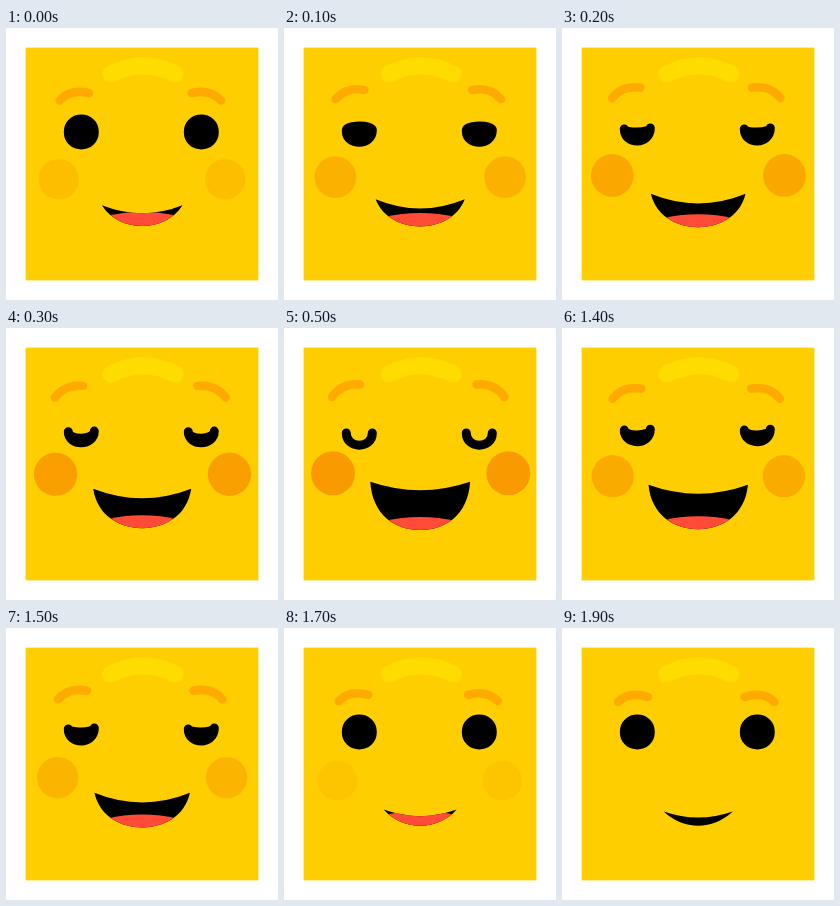
These frames come from a looping animation (272 px wide and 272 px high, 2600 ms). An HTML page:

```html
<!DOCTYPE html>
<html lang="en">
<head>
<meta charset="utf-8">
<title>Smiling square</title>
<style>
  html, body { margin: 0; width: 100%; height: 100%; overflow: hidden; background: #fff; }
  svg { display: block; width: 100vw; height: 100vh; }
</style>
</head>
<body>
<svg viewBox="0 0 272 272">
  <defs><clipPath id="lips"><path id="mouth"/></clipPath></defs>
  <rect x="19.6" y="19.6" width="232.8" height="232.8" fill="#ffce00"/>
  <path d="M105 46Q137 29.5 169 46" fill="none" stroke="#ffdc00" stroke-width="17" stroke-linecap="round"/>
  <g id="cheeks" fill="#f99b00"><circle/><circle/></g>
  <g fill="none" stroke="#ffaa00" stroke-width="8.5" stroke-linecap="round">
    <path class="brow"/><path class="brow" transform="translate(268.5) scale(-1 1)"/>
  </g>
  <g stroke="#000" stroke-width="9" stroke-linejoin="round">
    <path class="eye" transform="translate(75.3 104)"/><path class="eye" transform="translate(195.3 104)"/>
  </g>
  <g clip-path="url(#lips)">
    <rect x="80" y="145" width="115" height="60"/>
    <ellipse id="tongue" cx="136.2" rx="48" ry="14" fill="#ff4b37"/>
  </g>
</svg>
<script>
const LOOP = 2600, STEP = 100;
const CLOSE_START = 12; // step at which the laugh begins to fade
const $ = s => document.querySelector(s);
const $$ = s => [...document.querySelectorAll(s)];
const clamp = x => Math.min(1, Math.max(0, x));
const lerp = (a, b, k) => a + (b - a) * k;
const easeOut = (x, power) => 1 - (1 - clamp(x)) ** power;
const easeInOut = x => (1 - Math.cos(Math.PI * clamp(x))) / 2;
const set = (el, attrs) => Object.entries(attrs).forEach(([k, v]) => el.setAttribute(k, v));

const cheeks = $('#cheeks'), brows = $$('.brow'), eyes = $$('.eye');
const mouth = $('#mouth'), tongue = $('#tongue');

// Each value runs from 0 (resting face) to 1 (full laugh)
function poseAt(step) {
  const fade = step - CLOSE_START;
  if (fade <= 0) {
    const rise = (step + 1) / 6;
    return { joy: easeOut(rise, 2), smile: easeOut(rise, 1.3), lid: easeOut(step / 5, 1.5) };
  }
  return {
    joy: clamp(1 - fade / 6),
    smile: 1 - easeInOut((fade - 1) / 4.8),
    // lids lift slowly, then open fast
    lid: fade < 3 ? .845 - .105 * fade : clamp(.53 - .265 * (fade - 3))
  };
}

function browPath(joy) {
  const at = (a, b) => lerp(a, b, joy);
  return `M${at(56, 48)} ${at(74, 69)}Q${at(67, 58)} ${at(63, 55)} ${at(86, 76)} ${at(69, 56.5)}`;
}

function eyePath(lid) {
  const w = 13, round = 17.3;
  const squint = Math.sin(Math.PI * lid);
  const left = lid - 3.7 * squint ** 4, right = left - squint;
  const low = round - 4 * squint, up = round * (2 * lid - 1);
  return `M${-w} ${left}C${-w} ${low} ${w} ${low} ${w} ${right}C${w} ${up} ${-w} ${up} ${-w} ${left}Z`;
}

function drawMouth(smile) {
  const c = 136.2;
  const half = lerp(34.5, 49.9, easeOut(smile, 2));
  const y = lerp(183.5, 153.7, smile), bottom = lerp(197.7, 202, smile ** 2);
  const dip = 6 + 2.5 * smile + 2.3 * Math.sin(Math.PI * smile);
  const depth = bottom - y, side = y + depth * .69;
  const inset = half - 14 + depth / 4, reach = half * (.3 + depth / 240);
  set(mouth, { d: `M${c - half} ${y}Q${c} ${y + 2 * dip} ${c + half} ${y}` +
    `C${c + inset} ${side} ${c + reach} ${bottom} ${c} ${bottom}` +
    `C${c - reach} ${bottom} ${c - inset} ${side} ${c - half} ${y}Z` });
  set(tongue, { cy: 194 + depth * .185 });
}

function draw(time) {
  const step = Math.floor((time % LOOP) / STEP);
  const { joy, smile, lid } = poseAt(step);

  set(cheeks, { opacity: joy });
  [lerp(54.3, 49, joy), lerp(217, 224.3, joy)].forEach((cx, i) =>
    set(cheeks.children[i], { cx, cy: lerp(154, 145.3, joy), r: lerp(19.5, 22, joy) }));
  brows.forEach(el => set(el, { d: browPath(joy) }));
  eyes.forEach(el => set(el, { d: eyePath(lid) }));
  drawMouth(smile);
  set(tongue, { visibility: step < CLOSE_START + 7 ? 'visible' : 'hidden' });
}

function tick(now) {
  draw(now);
  requestAnimationFrame(tick);
}
draw(0);
requestAnimationFrame(tick);
</script>
</body>
</html>
```
